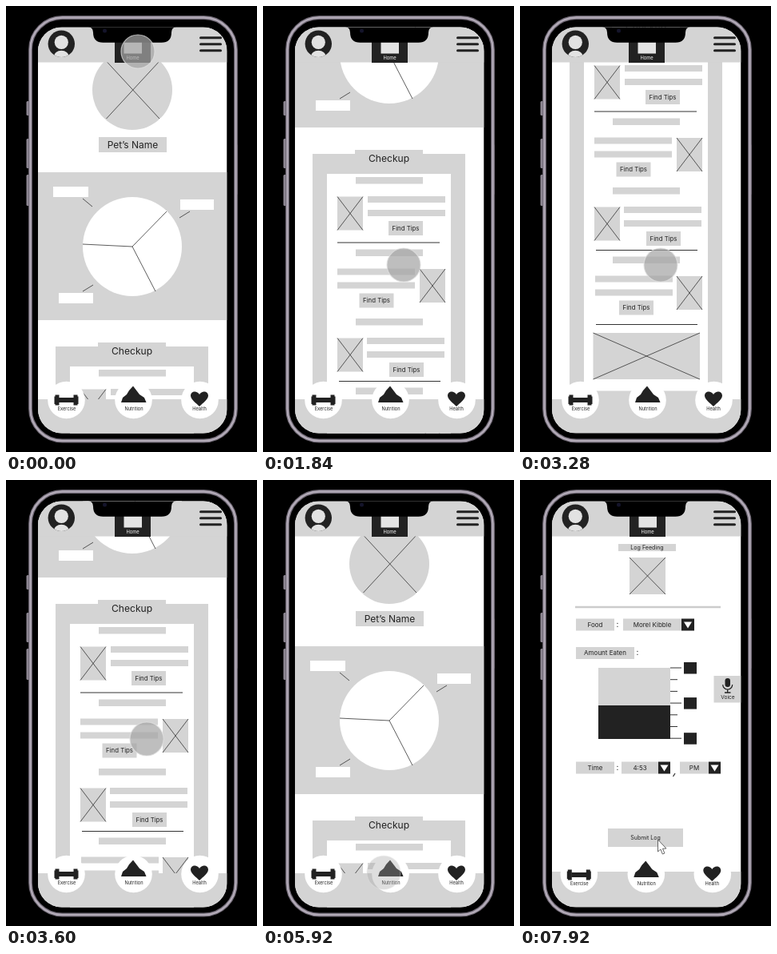
Recreate the animation shown at these times as an HTML page with a canvas. Size 314 by 558 pixels, loop 8000 ms.

```html
<!DOCTYPE html>
<html lang="en">
<head>
<meta charset="utf-8">
<title>Pet care wireframe</title>
<style>
html, body { margin: 0; width: 100%; height: 100%; overflow: hidden; background: #000; }
canvas { display: block; }
</style>
</head>
<body>
<canvas id="stage" width="314" height="558"></canvas>
<script>
const ctx = document.getElementById('stage').getContext('2d');
const LOOP = 8000, STEP = 80;
const GREY = '#d4d4d4', DARK = '#222', WHITE = '#fff';
const LEFT = 40, RIGHT = 276.5, TOP = 26.5, BOTTOM = 534.5;

// Each key is [time, value, ...].
const scrollKeys = [[1440, 0], [1840, 241], [2080, 338], [2320, 385], [2480, 385],
  [2560, 400], [2720, 420], [3200, 420], [3360, 390], [3600, 271], [3760, 0]];
const cursorKeys = [[960, 277, 515], [1360, 178, 355], [1520, 176, 324], [4240, 176, 324],
  [4800, 158, 470], [5280, 158, 470], [5760, 151, 491], [6880, 151, 492],
  [7280, 171, 451], [7360, 171, 451], [7520, 211, 462], [7600, 171, 450]];

function sample(keys, t) {
  const next = keys.findIndex(k => k[0] > t);
  if (next === 0) return keys[0].slice(1);
  if (next < 0) return keys[keys.length - 1].slice(1);
  const a = keys[next - 1], b = keys[next];
  const p = (t - a[0]) / (b[0] - a[0]);
  return a.slice(1).map((v, i) => v + (b[i + 1] - v) * p);
}

function box(x1, y1, x2, y2, color = GREY) {
  ctx.fillStyle = color;
  ctx.fillRect(x1, y1, x2 - x1, y2 - y1);
}
function disc(x, y, r, color) {
  ctx.fillStyle = color;
  ctx.beginPath();
  ctx.arc(x, y, r, 0, Math.PI * 2);
  ctx.fill();
}
function line(x1, y1, x2, y2, width = 0.8, color = '#333') {
  ctx.strokeStyle = color;
  ctx.lineWidth = width;
  ctx.beginPath();
  ctx.moveTo(x1, y1);
  ctx.lineTo(x2, y2);
  ctx.stroke();
}
function poly(points, color) {
  ctx.fillStyle = color;
  ctx.beginPath();
  points.forEach(p => ctx.lineTo(...p));
  ctx.closePath();
  ctx.fill();
}
function round(x, y, w, h, r) {
  ctx.beginPath();
  ctx.roundRect(x, y, w, h, r);
}
function text(str, x, y, size, color = DARK) {
  ctx.font = `${size}px Inter, sans-serif`;
  ctx.textAlign = 'center';
  ctx.textBaseline = 'middle';
  ctx.fillStyle = color;
  ctx.fillText(str, x, y);
}
function cross(x1, y1, x2, y2) {
  line(x1, y1, x2, y2);
  line(x2, y1, x1, y2);
}
function picture(x1, y1, x2, y2) {
  box(x1, y1, x2, y2);
  cross(x1, y1, x2, y2);
}
function label(str, x1, y1, x2, y2, size) {
  box(x1, y1, x2, y2);
  text(str, (x1 + x2) / 2, (y1 + y2) / 2 + 0.5, size);
}

function tip(y, pictureX, barX, buttonX) {
  box(116, y, 200, y + 8.5);
  picture(pictureX, y + 24.5, pictureX + 32, y + 66.5);
  box(barX, y + 24, barX + 97, y + 32);
  box(barX, y + 41, barX + 97, y + 49);
  label('Find Tips', buttonX, y + 55, buttonX + 43, y + 73, 7.8);
}

function homePage(scroll) {
  box(LEFT, TOP, RIGHT, BOTTOM, WHITE);
  ctx.save();
  ctx.translate(0, -scroll);

  disc(158, 105, 50, GREY);
  cross(125.5, 69, 192, 141);
  label('Pet’s Name', 116, 164, 201, 183, 12);

  box(LEFT, 208, RIGHT, 393);
  disc(158, 301, 62, WHITE);
  line(158, 301, 201, 257);
  line(158, 301, 96, 298);
  line(158, 301, 187, 357);
  box(59, 226, 103, 239, WHITE);
  box(218, 242, 260, 255, WHITE);
  box(66, 359, 109, 372, WHITE);
  line(96, 241, 108, 251);
  line(217, 265, 230, 257);
  line(96, 357, 109, 349);

  box(62, 426, 253, 907);
  box(80, 451, 235, 886.5, WHITE);
  label('Checkup', 115, 421, 200, 442, 12.1);
  tip(455, 93, 131, 157);
  line(93, 537, 221, 537, 1);
  tip(545.5, 196, 93, 120.5);
  tip(632, 93, 130, 158);
  line(95, 710.5, 222, 710.5, 1);
  tip(718.5, 196, 94, 124);
  line(95, 803.5, 222, 803.5, 1);
  picture(91.5, 814, 225, 872);
  ctx.restore();

  nav(0, 0);
  header(0);
}

function dropdown(str, x1, y1, split, x2) {
  label(str, x1, y1, split, y1 + 15, 8);
  box(split, y1, x2, y1 + 15, DARK);
  const cx = (split + x2) / 2;
  poly([[cx - 5, y1 + 4], [cx + 5, y1 + 4], [cx, y1 + 12]], WHITE);
}

function feedingPage() {
  box(LEFT, TOP, RIGHT, BOTTOM, WHITE);
  label('Log Feeding', 123, 80, 195, 89, 7.1);
  picture(137, 97, 182, 143);
  line(69, 159, 251, 159, 2.4, '#ccc');

  label('Food', 70, 173.5, 118, 188.5, 8);
  text(':', 122, 181, 10);
  dropdown('Morel Kibble', 129, 173.5, 202, 218);
  label('Amount Eaten', 70, 209, 143, 224, 8);
  text(':', 147, 216, 10);

  box(98, 235, 188, 282);
  box(98, 282, 188, 324, DARK);
  for (let i = 0; i < 7; i++) {
    const y = 235 + i * 14.7;
    const major = i % 3 === 0;
    line(188, y, major ? 202 : 197, y, 1);
    if (major) box(205, y - 7, 221, y + 7.5, DARK);
  }

  box(242.5, 245, RIGHT, 278.5);
  ctx.fillStyle = DARK;
  round(256.5, 248, 6.5, 11, 3.2);
  ctx.fill();
  ctx.strokeStyle = DARK;
  ctx.lineWidth = 1.2;
  ctx.beginPath();
  ctx.arc(259.7, 256, 6, 0, Math.PI);
  ctx.stroke();
  line(259.7, 262, 259.7, 266, 1.3, DARK);
  line(256, 266, 263.5, 266, 1.3, DARK);
  text('Voice', 260, 272.5, 6.6);

  label('Time', 70, 352.5, 118, 367.5, 8);
  text(':', 122, 360, 10);
  dropdown('4:53', 127, 352.5, 173, 188);
  line(194, 367, 191.5, 371, 1.3);
  dropdown('PM', 200, 352.5, 236, 251);
  label('Submit Log', 110, 436, 204, 459, 7);

  nav(-1.7, 1);
  header(1);
}

function avatar(x, y) {
  ctx.save();
  ctx.beginPath();
  ctx.arc(x, y, 16.7, 0, Math.PI * 2);
  ctx.clip();
  box(x - 18, y - 18, x + 18, y + 18, DARK);
  disc(x, y - 2, 8.6, '#e2e2e2');
  ctx.fillStyle = '#e2e2e2';
  ctx.beginPath();
  ctx.ellipse(x, y + 16, 9.5, 7.5, 0, 0, Math.PI * 2);
  ctx.fill();
  ctx.restore();
}

function header(dx) {
  box(LEFT, TOP, RIGHT, 70.5);
  avatar(69.3, 47.3);

  box(136 + dx, 42, 181 + dx, 71, DARK);
  box(147.5 + dx, 45, 170 + dx, 59.5, '#e4e4e4');
  text('Home', 158.5 + dx, 65.5, 5.8, WHITE);

  ctx.lineCap = 'round';
  for (const y of [39.8, 47.8, 55.8]) line(243.5, y, 268.5, y, 3, DARK);
  ctx.lineCap = 'butt';
}

function nav(dx, dy) {
  box(LEFT, 492 - dy * 2, RIGHT, BOTTOM);
  ctx.save();
  ctx.translate(dx, 0);
  for (const x of [75.5, 159.5, 242.5]) disc(x, 493, 23.3, WHITE);
  ctx.translate(0, dy);

  box(66, 490, 86, 496, DARK);
  for (const side of [-1, 1]) {
    const x = 75.5 + side * 11.5;
    box(x - 2.5, 486.5, x + 2.5, 499.5, DARK);
    box(x - 1.5 + side * 2, 488.5, x + 1.5 + side * 2, 498, DARK);
  }
  poly([[144, 496], [146, 490], [151, 486], [154, 481], [159, 475.5], [164, 482],
    [167, 486], [173, 490], [175.5, 496]], DARK);

  ctx.fillStyle = DARK;
  ctx.beginPath();
  ctx.moveTo(242, 501);
  ctx.bezierCurveTo(238, 497, 231, 492, 231, 487.5);
  ctx.bezierCurveTo(231, 481.5, 239, 480.5, 242, 486);
  ctx.bezierCurveTo(245, 480.5, 253, 481.5, 253, 487.5);
  ctx.bezierCurveTo(253, 492, 246, 497, 242, 501);
  ctx.fill();

  text('Exercise', 76, 504 + dy * 0.5, 5.7);
  text('Nutrition', 160, 504 + dy * 0.5, 5.7);
  text('Health', 242, 504 + dy * 0.5, 5.7);
  ctx.restore();
}

function touch(x, y, alpha) {
  ctx.save();
  ctx.globalAlpha = alpha;
  disc(x, y, 21, 'rgba(165,165,165,.72)');
  ctx.strokeStyle = 'rgba(225,225,225,.75)';
  ctx.lineWidth = 1.2;
  ctx.beginPath();
  ctx.arc(x, y, 21, 0, Math.PI * 2);
  ctx.stroke();
  ctx.restore();
}

function arrow(x, y) {
  const shape = [[0, 0], [0, 15], [3.4, 12], [5.8, 18], [8.4, 17], [6, 11.3], [10.5, 11]];
  poly(shape.map(([a, b]) => [x + a, y + b]), WHITE);
  ctx.strokeStyle = '#555';
  ctx.lineWidth = 0.9;
  ctx.stroke();
}

function cursor(t) {
  if (t < 320) return touch(165, 57, t < 240 ? 1 : 0.45);
  if (t < 1040) return;
  if (t >= 7920) return arrow(172.5, 450);
  const [x, y] = sample(cursorKeys, t);
  touch(x, y, t >= 5920 && t < 6160 ? 0.5 : 1);
}

function phone() {
  ctx.fillStyle = '#8d8692';
  for (const [x, y, h] of [[25.5, 119, 18], [25.5, 166, 37], [25.5, 211, 39], [286, 173, 63]]) {
    round(x, y, 4, h, 1.5);
    ctx.fill();
  }
  round(30.5, 14.5, 257, 529.5, 40);
  ctx.fillStyle = '#000';
  ctx.fill();
  ctx.strokeStyle = '#6f6874';
  ctx.lineWidth = 4.8;
  ctx.stroke();
  ctx.strokeStyle = '#b3abb8';
  ctx.lineWidth = 2.4;
  ctx.stroke();
}

function notch() {
  ctx.fillStyle = '#000';
  ctx.beginPath();
  ctx.moveTo(103, 26);
  ctx.quadraticCurveTo(109, 27, 109, 33);
  ctx.quadraticCurveTo(109, 45.7, 121.5, 45.7);
  ctx.lineTo(194.5, 45.7);
  ctx.quadraticCurveTo(207, 45.7, 207, 33);
  ctx.quadraticCurveTo(207, 27, 213, 26);
  ctx.fill();
  disc(123.5, 31, 2.5, '#14142a');
}

function draw(now) {
  const t = Math.floor((now % LOOP) / STEP) * STEP;
  const fade = Math.min(1, Math.max(0, (t - 6080) / 480));
  box(0, 0, 314, 558, '#000');
  phone();

  ctx.save();
  round(LEFT, TOP, RIGHT - LEFT, BOTTOM - TOP, 30);
  ctx.clip();
  if (fade < 1) homePage(sample(scrollKeys, t)[0]);
  if (fade > 0) {
    ctx.globalAlpha = fade;
    feedingPage();
    ctx.globalAlpha = 1;
  }
  notch();
  ctx.restore();
  cursor(t);
}

const start = performance.now();
function tick() {
  draw(performance.now() - start);
  requestAnimationFrame(tick);
}
tick();
</script>
</body>
</html>
```
